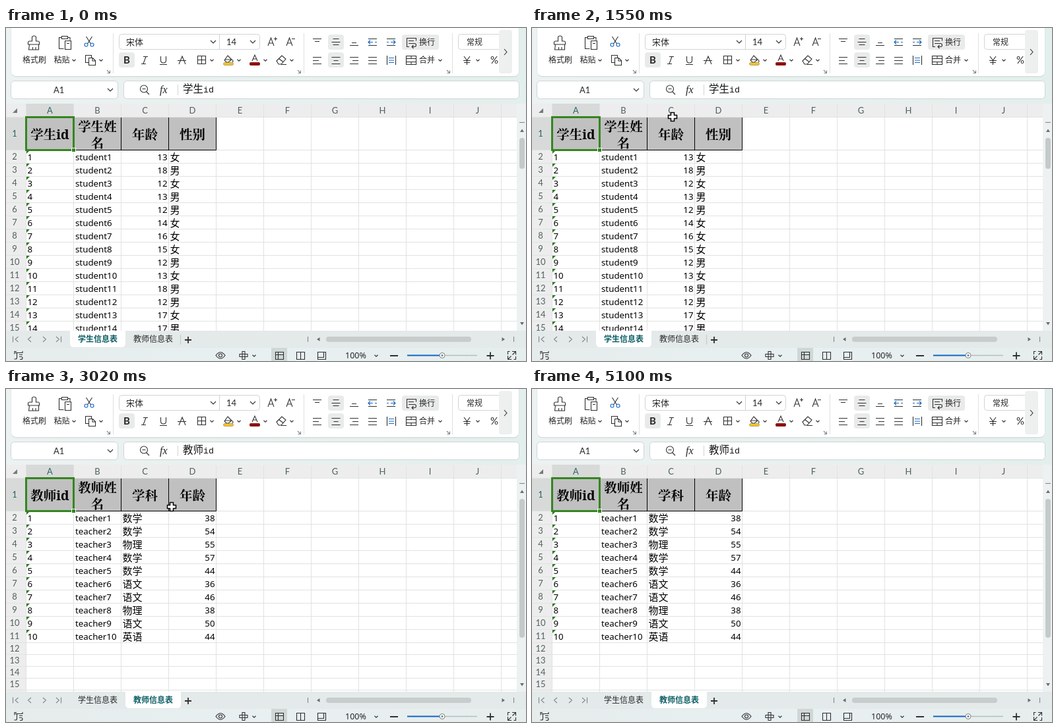
Write an HTML page that moves like this. It is 788x506 px and loops after 5.7 s.

```html
<!DOCTYPE html>
<html lang="zh">
<head>
<meta charset="utf-8">
<title>Spreadsheet</title>
<style>
html, body { margin: 0; width: 100%; height: 100%; overflow: hidden; background: #e9f0ef; }
svg { display: block; width: 788px; height: 506px; }
text { font: 12px "Noto Sans CJK SC", "Noto Sans CJK", sans-serif; fill: #262626; white-space: pre; }
.latin { font: 13px Lato, sans-serif; }
.head { fill: #4f6060; }
.on { fill: #2a6262; }
.cell { font: 13.3px "Noto Sans", "Open Sans", sans-serif; fill: #000; }
.han { font-size: 15px; fill: #000; }
.title { font: bold 19.5px "Noto Serif CJK SC", "Noto Sans CJK SC", "Noto Sans CJK", serif; fill: #000; }
.title .mono { font: bold 19.5px "Noto Serif", serif; }
.formula { font-size: 15.5px; fill: #111; }
.formula .mono { font: 13.2px "Liberation Mono", monospace; }
.icon { fill: none; stroke: #303030; stroke-width: 1.1; }
.blue { stroke: #1267c4; }
.muted { stroke: #808888; }
.grid { fill: none; stroke: #e0e2e2; }
.field { fill: #fff; stroke: #d0d5d5; }
.press { fill: #e9eaea; }
.end { text-anchor: end; }
.mid { text-anchor: middle; }
.active { fill: #0b5d62; font-weight: 700; }
</style>
</head>
<body>
<svg id="stage" viewBox="0 0 788 506">
  <defs>
    <linearGradient id="back"><stop stop-color="#ecf2f1"/><stop offset="1" stop-color="#e3efec"/></linearGradient>
    <linearGradient id="foot"><stop stop-color="#e6ecec"/><stop offset=".5" stop-color="#e8f0f1"/><stop offset="1" stop-color="#e6eded"/></linearGradient>
    <clipPath id="view"><path d="M0 115H774V460H0z"/></clipPath>
  </defs>
  <rect width="788" height="116" fill="url(#back)"/>
  <rect x="7.5" y="-10" width="770" height="84.5" rx="8" fill="#c9d2d0" opacity=".6"/>
  <rect x="8" y="-10" width="769" height="83" rx="7" fill="#fff"/>
  <g id="ribbon"></g>
  <text id="formula" x="268" y="98" class="formula"></text>
  <g id="sheets" clip-path="url(#view)"></g>
  <g id="frame"></g>
  <g id="tabs"></g>
  <g id="pointer">
    <g id="arrow">
      <circle id="halo" r="12" fill="#f4e52a" opacity=".72"/>
      <path d="M0 0V16L4 12.5L7 19L9.5 18L6.7 11.7H12z" fill="#fff" stroke="#111"/>
    </g>
    <path id="cross" d="M-2.5-6.5h5v4h4v5h-4v4h-5v-4h-4v-5h4z" fill="#fff" stroke="#000" stroke-width="1.5"/>
  </g>
</svg>
<script>
const $ = id => document.getElementById(id);
const text = (x, y, s, cls = '') => `<text x="${x}" y="${y}" class="${cls}">${s}</text>`;
const icon = (d, cls = '', extra = '') => `<path class="icon ${cls}" d="${d}" ${extra}/>`;
const box = (x, y, w, h, attrs) => `<rect x="${x}" y="${y}" width="${w}" height="${h}" ${attrs}/>`;
const solid = (d, fill) => `<path d="${d}" fill="${fill}"/>`;
const chevron = (x, y, s = 2.5) => icon(`M${x - s} ${y - s / 2}l${s} ${s}l${s} ${-s}`);
const launcher = x => icon(`M${x - 2} 64l4 4m.5-3.5v4h-4`, 'muted');
const mono = s => s.replace('id', '<tspan class="mono">id</tspan>');

// Horizontal strokes of a 13 px wide icon, each [y, inset left, inset right].
const strokes = (x, rows) => icon(rows.map(([y, l = 0, r = 0]) => `M${x + l} ${y + .5}H${x + 13 - r}`).join(''));

function ribbon() {
  const pressed = [[171, 37, 24, 23], [488, 10, 24, 23], [488, 37, 24, 23], [600, 10, 56, 23]];
  return pressed.map(b => box(...b, 'rx="4" class="press"')).join('')
    + icon('M162.5 8V69M451.5 8V69M676.5 8V69', '', 'style="stroke:#dfe3e3"')
    // clipboard
    + icon('M39.5 20v-6q0-2 3-2t3 2v6h3q2 0 2 2v3h-17v-3q0-2 2-2zM35.5 25l-1 8h15v-8M40.5 33v-4M45 33v-4')
    + icon('M84 14.5h-3.5v17h7M94 14.5h3v4M84.5 12.5h9v4h-9zM89.5 19.5h9v13h-9zM92 23.5h4')
    + icon('M121.5 13l7 11M130.5 13l-7 11')
    + icon('M124 25.5a2.5 2.5 0 1 1-5 0a2.5 2.5 0 1 1 5 0M133 25.5a2.5 2.5 0 1 1-5 0a2.5 2.5 0 1 1 5 0', 'blue')
    + icon('M125 52.5h-4.5v-11h9v4M125.5 45.5h6l4 4v7h-10zM131 46v4h4')
    + text(25, 53, '格式刷') + text(72.5, 53, '粘贴') + chevron(103, 49) + chevron(144, 49) + launcher(155)
    // font
    + box(171.5, 9.5, 213, 23, 'rx="4" class="field"') + icon('M323.5 10V32', '', 'style="stroke:#d0d5d5"')
    + `<text x="182" y="26" style="font-size:13px">宋体</text>` + text(334, 26, '14', 'latin')
    + chevron(314, 21, 4) + chevron(374, 21, 4)
    + icon('M397 27l4.5-12l4.5 12M398.7 23h5.6M406 16.5h5M408.5 14v5M425 27l4.5-12l4.5 12M426.7 23h5.6M433 16.5h5')
    + `<text x="178" y="54" style="font:bold 15px Lato,sans-serif">B</text>`
    + icon('M208 43.5h7M205 54.5h7M212 43.5l-4 11')
    + icon('M234.5 43v6q0 4 4 4t4-4v-6M233 55.5h11M262 55l5-12l5 12M260 49.5h13')
    + icon('M290.5 42.5h12v12h-12zM296.5 42.5v12M290.5 48.5h12')
    + icon('M336 42l6 6l-5 4h-3l-3-3zM332 48h9M343 48q2 3 0 4')
    + box(329.5, 52.5, 15, 4, 'rx="2" fill="#f5c32c" stroke="#8a7a3a" stroke-width=".6"')
    + icon('M373 50l4-9l4 9M374.5 47h5') + box(369, 52, 16, 5, 'rx="2" fill="#8d1212"')
    + icon('M410 50l8-8l6 5l-7 8h-4zM413.5 46.5l6.5 5M417 55.5h8')
    + [312, 353, 393, 433].map(x => chevron(x, 49)).join('') + launcher(444)
    // alignment
    + strokes(465, [[16], [20, 3, 3]]) + strokes(493.5, [[16, 2, 2], [21], [25, 2, 2]]) + strokes(521, [[22, 3, 3], [26]])
    + strokes(549, [[16], [26]]) + strokes(577, [[16], [26]])
    + icon('M549 21.5h7m-4-3l-3 3l3 3M559 21.5h3M583 21.5h7m-3-3l3 3l-3 3M577 21.5h3', 'blue')
    + strokes(465, [[44], [49, 0, 4], [54]]) + strokes(493.5, [[44], [49, 3, 3], [54]])
    + strokes(521, [[44], [49, 4], [54]]) + strokes(549, [[44], [49], [54]])
    + icon('M577.5 42v14M590.5 42v14') + icon('M580 45.5h8M580 52.5h8M580 49h8', 'blue')
    + icon('M611 28.5h-3.5v-13h14v4M610 19.5h8M610 23.5h9q2.5 0 2.5 2.5t-2.5 2.5h-4m2.5-2.5l-2.5 2.5l2.5 2.5')
    + icon('M606.5 42.5h15v13h-15zM606.5 46.5h15M606.5 51.5h15M614 42.5v4M614 51.5v4')
    + text(626, 25.5, '换行') + text(626, 53, '合并') + chevron(658, 49) + launcher(670)
    // number
    + box(685.5, 9.5, 70, 23, 'rx="4" class="field"') + text(698, 25.5, '常规')
    + icon('M694 43l4.5 6l4.5-6M698.5 49v7M693 49.5h11M694 52.5h9') + chevron(715, 49)
    + `<text x="734" y="54" style="font:15px Lato,sans-serif">%</text>`
    + box(747, 3, 20, 66, 'rx="4" fill="#eeefef"') + icon('M755 32l4 4.5l-4 4.5')
    // formula bar
    + box(7.5, 80.5, 162, 27, 'rx="5" class="field"') + box(178.5, 80.5, 599, 27, 'rx="5" class="field"')
    + text(72, 99, 'A1', 'latin') + chevron(158, 94, 4)
    + icon('M214.5 92.5a5.5 5.5 0 1 1-11 0a5.5 5.5 0 1 1 11 0M213 97l4 4M206.5 92.5h5')
    + `<text x="233" y="99" style="font:italic 16px Liberation Serif,serif">fx</text>`
    + icon('M260.5 86V102', '', 'style="stroke:#d3d7d7"');
}

const colX = i => 30 + 72 * i;

function sheet({ titles, column, rows, filled }) {
  const tops = [];
  for (let r = 0, y = 186; y < 462; r++) {
    tops.push(y);
    y += r < filled ? 20 : 18;
  }
  let out = box(0, 115, 774, 345, 'fill="#fff"') + box(0, 115, 774, 20, 'fill="#ededed"') + box(0, 135, 30, 325, 'fill="#ededed"')
    + box(30, 115, 73, 20, 'fill="#d8dada"') + box(0, 136, 30, 50, 'fill="#d8dada"')
    + solid('M17 122v7h-7z', '#737b7b');
  let lines = 'M0 135.5H774';
  for (let i = 0; i < 11; i++) lines += `M${colX(i) + .5} 116V460`;
  for (const y of tops) lines += `M0 ${y - .5}H774`;
  out += `<path class="grid" d="${lines}"/>`;
  [...'ABCDEFGHIJ'].forEach((c, i) => out += text(colX(i) + 36.5, 130, c, `latin mid ${i ? 'head' : 'on'}`));
  out += text(13, 165, '1', 'latin mid on');
  tops.forEach((y, r) => out += text(13, y + (r < filled ? 14 : 13), r + 2, 'latin mid head'));

  out += box(30, 136, 289, 50, 'fill="#c0c0c0"');
  titles.forEach((t, i) => {
    const x = colX(i), mid = x + 36.5;
    out += `<path d="M${x} 185.5h72.5V136" fill="none" stroke="#000"/>`;
    out += t.length === 4 && !t.includes('id')
      ? text(mid, 157, t.slice(0, 3), 'title mid') + text(mid, 182, t[3], 'title mid')
      : text(mid, 169, mono(t), 'title mid');
  });
  rows.forEach(([age, label], r) => {
    const y = tops[r];
    out += solid(`M31 ${y}h5l-5 5z`, '#2b7a1e')
      + text(32.5, y + 15, r + 1, 'cell') + text(105, y + 15, column.name + (r + 1), 'cell')
      + text(colX(column.age) + 70.5, y + 15, age, 'cell end')
      + text(colX(column.label) + 2.5, y + 16, label, 'han');
  });
  out += box(30.5, 135.5, 72, 50, 'fill="none" stroke="#358520" stroke-width="3"')
    + box(99.5, 182.5, 6, 6, 'fill="#358520" stroke="#fff"');
  return `<g>${out}</g>`;
}

const students = {
  titles: ['学生id', '学生姓名', '年龄', '性别'],
  column: { name: 'student', age: 2, label: 3 },
  rows: '13女 18男 12女 13男 12男 14女 16女 15女 12男 13女 18男 12男 17女 17男',
  thumb: 47
};
const teachers = {
  titles: ['教师id', '教师姓名', '学科', '年龄'],
  column: { name: 'teacher', age: 3, label: 2 },
  rows: '38数学 54数学 55物理 57数学 44数学 36语文 46语文 38物理 50语文 44英语',
  thumb: 211
};
const books = [students, teachers];
for (const b of books) {
  b.rows = b.rows.split(' ').map(s => [s.slice(0, 2), s.slice(2)]);
  b.filled = b.rows.length;
}

function frame() {
  return box(774, 115, 14, 345, 'fill="#edf1f1"') + icon('M778 143.5h8', 'muted')
    + solid('M779 158l3-4.5l3 4.5z M779 447l3 4.5l3-4.5z', '#666e6e')
    + box(0, 460, 788, 27, 'fill="#e4e9ea"') + box(0, 486, 788, 20, 'fill="url(#foot)"')
    + icon('M10.5 468.5v9M18.5 469l-4.5 4l4.5 4M38 469l-4.5 4l4.5 4M56 469l4.5 4l-4.5 4M76 469l4.5 4l-4.5 4M83.5 468.5v9M457.5 469v8M769.5 469v8', 'muted')
    + box(485, 469, 220, 8, 'rx="4" fill="#c7cccc"')
    + solid('M475.5 470v6l-4.5-3z M751.5 470v6l4.5-3z', '#666e6e')
    + icon('M276 469v10M271 474h10', '', 'style="stroke-width:1.8"')
    // status bar
    + icon('M14 493.5h11M16.5 493v8q0 2-2 2h-2M16 491.5h-3v4M20 496.5h5M20 499.5h3q2 0 2 2t-2 2h-2M25 491v3')
    + icon('M318 497.5q7-9.5 14 0q-7 9.5-14 0zM327.5 497.5a2.5 2.5 0 1 1-5 0a2.5 2.5 0 1 1 5 0')
    + icon('M358 491.5h4v4h4v4h-4v4h-4v-4h-4v-4h4zM358 495.5h4v4h-4z') + chevron(376, 498)
    + box(402, 486, 24, 20, 'fill="#d0d7d7"')
    + icon('M408.5 492.5h12v11h-12zM408.5 496.5h12M412.5 492.5v11')
    + icon('M440.5 492.5h12v11h-12zM446.5 492.5v11')
    + icon('M472.5 492.5h12v11h-12zM472.5 500.5h9v-8')
    + `<text x="514" y="502" style="font:12.5px Noto Sans,sans-serif">100%</text>` + chevron(561, 498)
    + icon('M582 498h12M728.5 498h11M734 492.5v11', '', 'style="stroke-width:1.8"')
    + icon('M661 497.5H714', '', 'style="stroke:#b5bdbd;stroke-width:1.5"')
    + icon('M608 497.5H661', 'blue', 'style="stroke-width:2"')
    + `<circle cx="661" cy="497.5" r="4" fill="#fff" stroke="#777f7f"/><circle cx="661" cy="497.5" r="1.5" fill="#777f7f"/>`
    + icon('M767 491.5h5.5v5M772 492l-4.5 4.5M760.5 498v5.5h5.5M761 503l4.5-4.5M760.5 496v-4.5h3M772.5 499v4.5h-3')
    + box(778, 167, 8, 47, 'id="thumb" rx="4" fill="#c4c9c9"');
}

const tabShape = x => `M${x} 460h84v19q0 6-6 6h-72q-6 0-6-6z`;

function tabs(active, hover) {
  const names = ['学生信息表', '教师信息表'];
  return solid(tabShape(active ? 181 : 97), '#fff')
    + (hover ? solid(tabShape(181), '#cbcdcd') : '')
    + (active || hover ? '' : icon('M264.5 466v15', '', 'style="stroke:#c3caca"'))
    + names.map((n, i) => text(109 + 84 * i, 477, n, i === active ? 'active' : '')).join('');
}

$('ribbon').innerHTML = ribbon();
$('sheets').innerHTML = books.map(sheet).join('');
$('frame').innerHTML = frame();

// Pointer bursts: the knots are [step, x, y].
const LOOP = 5700, GONE = 5082, CLICK = 2590, SWITCH = 2675;
const bursts = [
  { from: 400, to: 930, steps: 9, knots: [[0, 447, 488], [5, 246, 461], [8, 131, 296]] },
  { from: 1000, to: 1550, steps: 9, knots: [[0, 118, 250], [2, 61, 165], [5, 303, 160], [8, 213, 135]] },
  { from: 1620, to: 2140, steps: 9, knots: [[0, 190, 160], [2, 128, 230], [4, 160, 420], [5, 230, 450], [6, 309, 380], [8, 235, 440]] },
  { from: 2330, to: 2850, steps: 7, knots: [[0, 237, 468], [3, 240, 474], [4, 240, 474], [6, 250, 416]] },
  { from: 2940, to: 3470, steps: 9, knots: [[0, 250, 300], [1, 251, 179], [4, 69, 172], [7, 287, 160], [8, 255, 148]] },
  { from: 3560, to: 4030, steps: 8, knots: [[0, 240, 142], [2, 209, 139], [4, 97, 165], [6, 215, 201], [7, 252, 189]] },
  { from: 4160, to: 4500, steps: 6, knots: [[0, 253, 200], [5, 245, 326]] },
  { from: 4810, to: 5100, steps: 5, knots: [[0, 300, 340], [3, 736, 436], [4, 780, 450]] }
];

function pointerAt(t) {
  const burst = bursts.findLast(b => t >= b.from);
  if (!burst || t >= GONE) return null;
  const { from, to, steps, knots } = burst;
  const step = Math.min(steps - 1, Math.floor((t - from) / (to - from) * (steps - 1) + .23));
  const end = Math.max(1, knots.findIndex(k => k[0] >= step));
  const [s0, x0, y0] = knots[end - 1], [s1, x1, y1] = knots[end];
  const u = (step - s0) / (s1 - s0);
  return [Math.round(x0 + (x1 - x0) * u), Math.round(y0 + (y1 - y0) * u)];
}

const show = (el, on) => el.style.display = on ? '' : 'none';
let lastTabs = '';

function draw() {
  const t = performance.now() % LOOP;
  const active = t >= SWITCH ? 1 : 0;
  const pos = pointerAt(t);
  const [x, y] = pos || [0, 0];
  const hover = !active && x > 181 && x < 264 && y > 462 && y < 485;
  const key = `${active}${hover}`;
  if (key !== lastTabs) {
    lastTabs = key;
    $('tabs').innerHTML = tabs(active, hover);
    [...$('sheets').children].forEach((g, i) => show(g, i === active));
    $('thumb').setAttribute('height', books[active].thumb);
    $('formula').innerHTML = mono(books[active].titles[0]);
  }
  show($('pointer'), pos);
  $('pointer').setAttribute('transform', `translate(${x} ${y})`);
  show($('arrow'), y > 462);
  show($('cross'), y <= 462);
  show($('halo'), t >= CLICK && t < SWITCH);
  requestAnimationFrame(draw);
}
draw();
</script>
</body>
</html>
```
